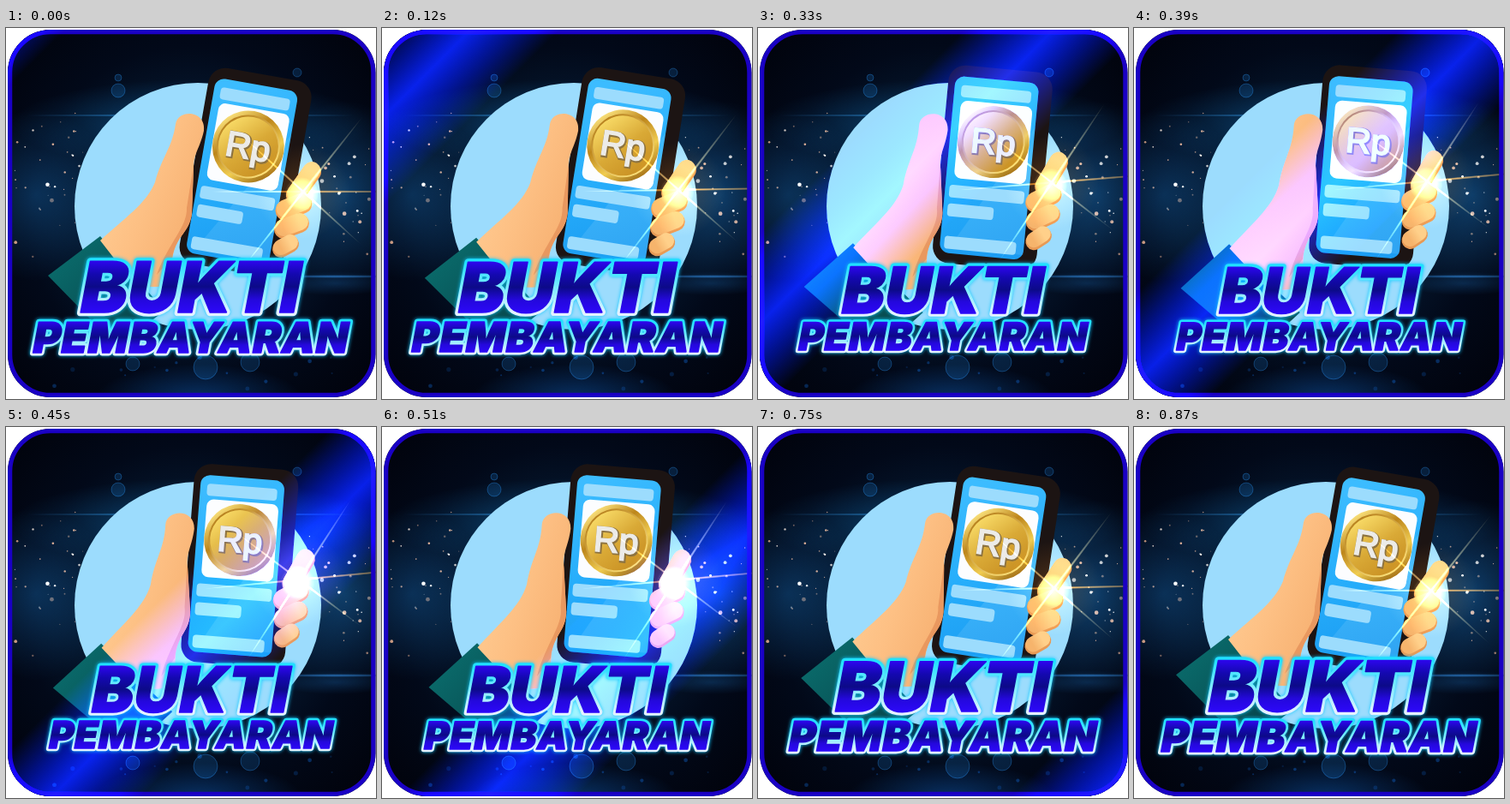
These frames come from a looping animation (432x433 px, 900 ms). An HTML page with a canvas:

```html
<!DOCTYPE html>
<html lang="id">
<head>
<meta charset="utf-8">
<title>Bukti Pembayaran</title>
<style>
html, body { margin: 0; width: 100%; height: 100%; overflow: hidden; background: #fff; }
canvas { display: block; }
</style>
</head>
<body>
<canvas id="stage" width="432" height="433"></canvas>
<script>
const W = 432, H = 433, LOOP = 900, TAU = Math.PI * 2;
const g = document.getElementById('stage').getContext('2d');

function gradient(grad, stops) {
  stops.forEach((c, i) => grad.addColorStop(i / (stops.length - 1), c));
  return grad;
}
const linear = (x0, y0, x1, y1, ...stops) => gradient(g.createLinearGradient(x0, y0, x1, y1), stops);
const radial = (x, y, r, ...stops) => gradient(g.createRadialGradient(x, y, 0, x, y, r), stops);
const noise = n => { const v = Math.sin(n * 127.1 + 3.7) * 43758.5453; return v - Math.floor(v); };

function shape(fill, build) {
  g.beginPath();
  build();
  g.fillStyle = fill;
  g.fill();
}
const disc = (x, y, r, fill) => shape(fill, () => g.arc(x, y, r, 0, TAU));
const box = (x, y, w, h, r, fill) => shape(fill, () => g.roundRect(x, y, w, h, r));
const poly = (fill, ...pts) => shape(fill, () => pts.forEach(p => g.lineTo(...p)));

function layer(draw) {
  g.save();
  draw();
  g.restore();
}

// Soft elliptical light
function glow(x, y, rx, ry, color, angle = 0) {
  layer(() => {
    g.translate(x, y);
    g.rotate(angle);
    g.scale(rx, ry);
    disc(0, 0, 1, radial(0, 0, 1, color, color.slice(0, 7) + '00'));
  });
}

function backdrop() {
  g.fillStyle = radial(216, 215, 290, '#0a3556', '#061c35', '#020919', '#01030c');
  g.fillRect(0, 0, W, H);
  g.globalCompositeOperation = 'lighter';
  glow(216, 112, 210, 52, '#0a4468aa');
  glow(35, 195, 90, 100, '#0c3858aa');
  glow(395, 195, 90, 110, '#104468bb');
  glow(225, 432, 120, 40, '#0b4d9088');
  glow(216, 102, 200, 1.8, '#2a70a0cc');
  glow(385, 290, 90, 2, '#2f78b8aa');
  glow(385, 298, 70, 14, '#12467066');
  for (let i = 0; i < 80; i++) {
    const side = i % 2, spread = noise(i) * 90;
    const x = side ? 425 - spread : 10 + spread;
    const y = 185 + (noise(i + 100) + noise(i + 200) - 1) * 95 + (side ? 12 : 0);
    const r = 0.6 + noise(i + 300) ** 3 * 2;
    g.globalAlpha = 0.3 + noise(i + 400) * 0.7;
    disc(x, y, r, noise(i + 500) > 0.35 ? '#e69a62' : '#ffdcb8');
  }
  for (let i = 0; i < 20; i++) {
    g.globalAlpha = 0.15 + noise(i + 60) * 0.3;
    disc(noise(i + 20) * W, 384 + noise(i + 40) * 44, 1 + noise(i + 80) * 2, '#0c58b0');
  }
  g.globalAlpha = 0.4;
  g.strokeStyle = '#1a6098';
  [[131, 73, 8], [131, 58, 4], [340, 52, 5], [233, 396, 14], [285, 390, 11], [148, 392, 8]].forEach(([x, y, r]) => {
    disc(x, y, r, '#0c3a5c');
    g.stroke();
  });
}

function sleeve() {
  poly(linear(60, 260, 140, 350, '#0a6c6c', '#07494e'), [49, 289], [110, 243], [185, 330], [130, 372]);
}

function hand() {
  shape(linear(110, 170, 225, 215, '#ffcd94', '#fdc084', '#f7b172'), () => {
    g.moveTo(110, 248);
    g.bezierCurveTo(138, 222, 164, 205, 174, 180);
    g.bezierCurveTo(182, 150, 194, 140, 198, 112);
    g.bezierCurveTo(201, 94, 234, 96, 231, 120);
    g.bezierCurveTo(226, 142, 219, 145, 219, 165);
    g.lineTo(217, 216);
    g.bezierCurveTo(214, 240, 200, 240, 195, 265);
    g.lineTo(190, 302);
    g.lineTo(152, 302);
    g.closePath();
  });
  shape('#e9985f', () => {
    g.moveTo(219, 160);
    g.lineTo(217, 216);
    g.bezierCurveTo(214, 240, 200, 240, 194, 268);
    g.lineTo(176, 288);
    g.bezierCurveTo(190, 250, 212, 232, 211, 210);
    g.closePath();
  });
}

function phone() {
  g.translate(278, 166);
  g.rotate(10 * Math.PI / 180);
  box(-59, -114, 122, 232, 20, '#1c1413');
  box(-51, -101, 98, 207, 11, linear(-40, -90, 45, 90, '#3cbcff', '#27aefb', '#1b9cf2'));
  poly('#ffffff18', [47, -50], [47, 100], [-40, 100]);
  const bar = '#9cdcfd';
  box(-43, -91, 82, 14, 4, bar);
  box(-42, -73, 84, 91, 8, '#fcfdff');
  box(-46, 26, 88, 15, 4, bar);
  box(-46, 48, 54, 15, 4, bar);
  box(-46, 86, 84, 15, 4, bar);
  disc(0, -28, 42, linear(-30, -60, 30, 8, '#fbe27c', '#bd861c', '#f0cc50', '#94620f'));
  disc(0, -28, 37, linear(-25, -55, 28, 0, '#b98320', '#fbe07a'));
  disc(0, -28, 35, linear(-25, -55, 28, 0, '#f8da66', '#d9a936', '#c88f22'));
  g.font = '41px "Liberation Sans", Arial, sans-serif';
  g.textAlign = 'center';
  g.lineWidth = 4;
  g.strokeStyle = '#8d7340';
  g.strokeText('Rp', 1, -13);
  g.lineWidth = 2;
  g.strokeStyle = g.fillStyle = '#ecebe8';
  g.strokeText('Rp', 0, -14);
  g.fillText('Rp', 0, -14);
}

function fingers() {
  g.lineCap = 'round';
  [[338, 194, 357, 167, 22], [326, 212, 346, 204, 23], [324, 234, 343, 227, 22], [321, 257, 332, 251, 20]]
    .forEach(([x0, y0, x1, y1, width]) => {
      const line = (dy, w, color) => {
        g.beginPath();
        g.moveTo(x0, y0 + dy);
        g.lineTo(x1, y1 + dy);
        g.lineWidth = w;
        g.strokeStyle = color;
        g.stroke();
      };
      line(1, width, '#e89a55');
      line(-1, width - 2, linear(x0, y0, x1, y1, '#f6b46c', '#ffd08a'));
    });
}

function flare() {
  g.globalCompositeOperation = 'lighter';
  glow(347, 191, 55, 55, '#9a5a1055');
  glow(345, 194, 20, 20, '#ffe9a0aa');
  glow(347, 191, 112, 1.8, '#ffe08acc', -0.9);
  glow(347, 191, 92, 1.7, '#ffd880bb', 0.74);
  glow(365, 191, 130, 1.7, '#ff9c20dd');
}

// Diagonal blue light; its position is measured as x + y
function sheen(t) {
  const mid = (415 + (t - 390) * 1.15) / 2, half = 52;
  g.globalCompositeOperation = 'lighter';
  g.fillStyle = linear(mid - half, mid - half, mid + half, mid + half,
    '#0018ff00', '#0018ff70', '#0820ffd8', '#0018ff70', '#0018ff00');
  g.fillRect(0, 0, W, H);
}

function title(text, size, y, spacing) {
  layer(() => {
    g.translate(217, y);
    g.transform(1, 0, -0.19, 1, 0, 0);
    g.font = `900 ${size}px Inter, "Open Sans", sans-serif`;
    g.letterSpacing = spacing + 'px';
    g.textAlign = 'center';
    g.lineJoin = 'round';
    const cap = size * 0.727, base = cap / 2;
    g.shadowColor = '#10c8ff';
    g.shadowBlur = 4;
    g.strokeStyle = linear(0, -base, 0, base, '#20e0ff', '#7cecff', '#e4f2ff');
    g.lineWidth = size * 0.04 + 5;
    g.strokeText(text, 0, base);
    g.shadowBlur = 0;
    g.fillStyle = g.strokeStyle = linear(0, -base, 0, base, '#2c06ec', '#1408b0', '#0c0a88', '#2408dc', '#2c08f8');
    g.lineWidth = 1.5;
    g.strokeText(text, 0, base);
    g.fillText(text, 0, base);
  });
}

function render(t) {
  const swing = (1 - Math.cos(t / LOOP * TAU)) / 2;
  g.clearRect(0, 0, W, H);
  layer(() => {
    g.beginPath();
    g.roundRect(2, 2, 429.5, 429, 50);
    g.clip();
    layer(backdrop);
    disc(224, 208, 144, '#9cdcfd');
    layer(() => {
      g.translate(278 - 7 * swing, 166 - 6 * swing);
      g.rotate(-5.5 * Math.PI / 180 * swing);
      g.translate(-278, -166);
      [sleeve, phone, hand, fingers, flare].forEach(layer);
    });
    g.beginPath();
    g.roundRect(4.5, 4.5, 424.5, 424, 47.5);
    g.lineWidth = 5.5;
    g.strokeStyle = '#1a00c4';
    g.stroke();
    layer(() => sheen(t));
  });
  layer(() => {
    const scale = 1 - 0.1 * swing;
    g.translate(217, 345);
    g.scale(scale, scale);
    g.translate(-217, -345);
    title('BUKTI', 82, 302, 0);
    title('PEMBAYARAN', 49, 361, 1);
  });
}

function tick() {
  render(performance.now() % LOOP);
  requestAnimationFrame(tick);
}
tick();
</script>
</body>
</html>
```
